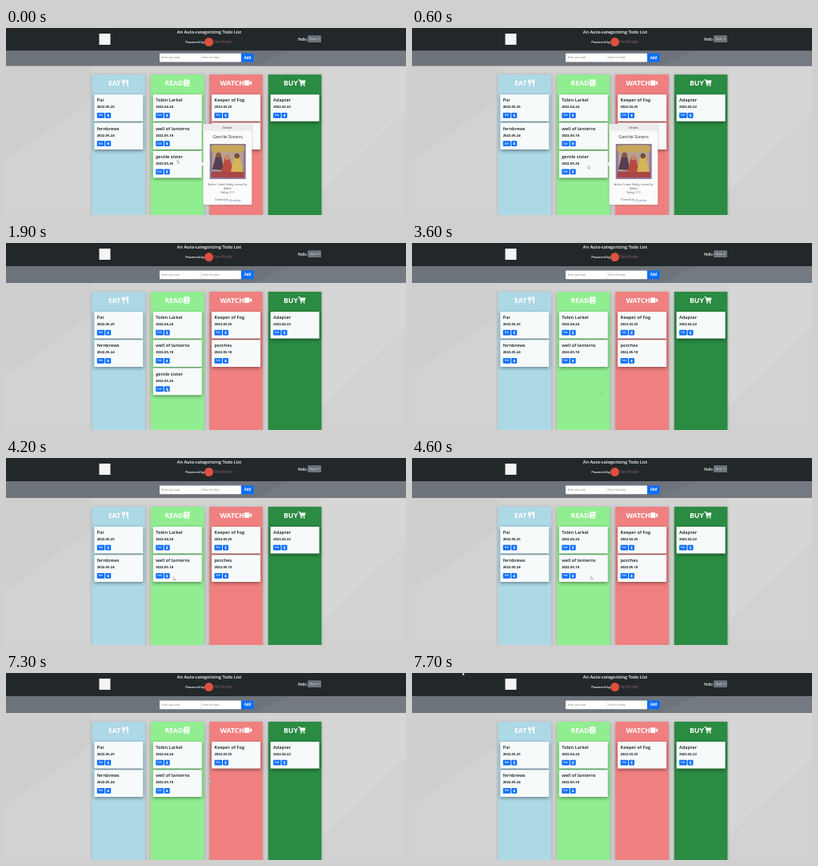
An HTML page with a canvas that plays this animation: 500 px wide and 234 px high, repeating every 8400 ms.

```html
<!DOCTYPE html>
<html lang="en">
<head>
<meta charset="utf-8">
<title>Todo list</title>
<style>
html, body { margin: 0; width: 100%; height: 100%; overflow: hidden; background: #d2d2d2; }
canvas { display: block; width: 500px; height: 234px; }
</style>
</head>
<body>
<canvas id="stage"></canvas>
<script>
const W = 500, H = 234, LOOP = 8400;
const CLOSE = 1100, DELETE_BOOK = 2500, DELETE_SHOW = 5300;
const BLUE = '#0d6efd', INK = '#16191c';
const FONT = '"Open Sans", "Noto Sans", sans-serif';

const canvas = document.getElementById('stage');
const ctx = canvas.getContext('2d');
const scale = Math.max(1, window.devicePixelRatio || 1);
canvas.width = W * scale;
canvas.height = H * scale;

const columns = [
  { x: 107.5, name: 'EAT', color: '#add8e6', labelX: 128, icon: utensils, iconX: 145,
    cards: [['Pai', '2022-05-25'], ['fernbrews', '2022-05-24']] },
  { x: 181, name: 'READ', color: '#90ee90', labelX: 198.5, icon: book, iconX: 222,
    cards: [['Tobin Larkel', '2022-04-24'], ['well of lanterns', '2022-05-18'],
            ['gentle sister', '2022-05-26', DELETE_BOOK]] },
  { x: 254.3, name: 'WATCH', color: '#f08080', labelX: 267.5, icon: camera, iconX: 298,
    cards: [['Keeper of Fog', '2022-03-25'], ['porches', '2022-05-10', DELETE_SHOW]] },
  { x: 327.8, name: 'BUY', color: '#2a8b42', labelX: 347, icon: cart, iconX: 365,
    cards: [['Adapter', '2022-02-22']] }
];

// time, x, y of the pointer
const path = [
  [0, 214, 165], [600, 220, 172], [1200, 220, 172], [1900, 201, 182],
  [3500, 201, 182], [3600, 235, 184], [4200, 209, 149], [4400, 211, 148],
  [5100, 274, 147], [5300, 276, 149], [7200, 276, 149], [7700, 63, -1], [LOOP, 63, -1]
];

function rect(x, y, w, h, color, r = 0) {
  ctx.fillStyle = color;
  ctx.beginPath();
  ctx.roundRect(x, y, w, h, r);
  ctx.fill();
}

function shape(color, ...points) {
  ctx.fillStyle = color;
  ctx.beginPath();
  points.forEach(p => ctx.lineTo(p[0], p[1]));
  ctx.closePath();
  ctx.fill();
}

function disc(x, y, r, color) {
  ctx.fillStyle = color;
  ctx.beginPath();
  ctx.arc(x, y, r, 0, Math.PI * 2);
  ctx.fill();
}

function text(str, x, y, size, color, weight = 400, align = 'left') {
  ctx.font = `${weight} ${size}px ${FONT}`;
  ctx.fillStyle = color;
  ctx.textAlign = align;
  ctx.fillText(str, x, y);
}

function shadow(blur, dy, color) {
  ctx.shadowBlur = blur * scale;
  ctx.shadowOffsetY = dy * scale;
  ctx.shadowColor = color;
}

function noShadow() {
  ctx.shadowColor = 'transparent';
}

// Heading icons, drawn from their top left corner
function utensils(x, y) {
  for (let i = 0; i < 3; i++) rect(x + i * 1.5, y, 1, 3.5, '#fff', .4);
  rect(x, y + 2.5, 4, 1.8, '#fff', .8);
  rect(x + 1.4, y + 3, 1.2, 5.4, '#fff', .5);
  rect(x + 5.2, y, 2.7, 5, '#fff', 1.2);
  rect(x + 6.5, y, 1.4, 8.4, '#fff', .5);
}

function book(x, y, ink) {
  rect(x, y, 7.4, 8.4, '#fff', 1);
  rect(x + 1.4, y + 6.2, 5.2, 1, ink);
  rect(x + 2, y + 2, 3.8, .6, ink);
  rect(x + 2, y + 3.4, 3.8, .6, ink);
}

function camera(x, y) {
  rect(x, y + 1, 6.3, 6.6, '#fff', 1);
  shape('#fff', [x + 6.6, y + 3.4], [x + 9.2, y + 1.6], [x + 9.2, y + 7], [x + 6.6, y + 5.2]);
}

function cart(x, y) {
  rect(x, y, 2.6, 1, '#fff', .4);
  shape('#fff', [x + 1.8, y], [x + 2.7, y], [x + 4, y + 6], [x + 3, y + 6]);
  shape('#fff', [x + 2.5, y + 1.1], [x + 9.6, y + 1.1], [x + 8.6, y + 4.9], [x + 3.2, y + 4.9]);
  rect(x + 3.1, y + 5.4, 5.5, .9, '#fff');
  disc(x + 4, y + 7.5, .9, '#fff');
  disc(x + 7.7, y + 7.5, .9, '#fff');
}

function drawBackdrop() {
  rect(0, 0, W, H, '#d2d2d2');
  shape('#d6d6d6', [394, 47], [500, 47], [500, 105], [394, 205]);
  shape('#cecece', [0, 47], [107, 47], [107, 90], [0, 165]);
}

function drawHeader(open) {
  const dy = open ? -2.6 : 0;
  const split = open ? 28.3 : 29, end = open ? 47.5 : 50;
  rect(0, 0, W, end, '#6d747b');
  shape('#747a81', [310, end], [355, split], [500, split], [500, end]);
  rect(0, 0, W, split, '#22272a');

  rect(116.5, 7, 14, 14, '#f4f4f4');
  text('An Auto-categorizing Todo List', 254, 6.7, 5.5, '#fff', 600, 'center');
  text('Powered by', 224.2, 18.7, 4.25, '#fff', 600);
  disc(253.6, 17.6, 5.5, '#de4f40');
  text('FernFinder', 260.2, 19.1, 4.6, '#8d6463');

  text('Hello', 365, 15.5, 4.4, '#fff', 600);
  rect(377, 9.2, 17, 8.8, '#6c757d', 1);
  text('User', 379.6, 15, 3.8, '#eee');
  shape('#eee', [389.6, 13], [391.8, 13], [390.7, 14.3]);

  const y = 34.4 + dy;
  rect(192, y, 102, 10.8, '#fff', .8);
  rect(243, y, .5, 10.8, '#ced4da');
  text('Enter your task', 194.7, y + 6.5, 3.2, '#777');
  text('Enter the date', 245.6, y + 6.5, 3.2, '#777');
  rect(294, y, 15.8, 10.8, BLUE, 1);
  text('Add', 302, y + 6.8, 4.4, '#fff', 700, 'center');
}

function drawCard(x, y, title, date) {
  shadow(4, 1.6, 'rgba(0,0,0,.42)');
  rect(x, y, 61, 33.6, '#f7fafb', .6);
  noShadow();
  text(title, x + 3.4, y + 9, 5.7, INK, 600);
  text(date, x + 3.4, y + 17, 4.2, INK, 700);
  rect(x + 3.5, y + 22.7, 9.5, 6.8, BLUE, .8);
  text('Edit', x + 8.2, y + 27.1, 2.9, '#fff', 600, 'center');
  rect(x + 13.9, y + 22.7, 7, 6.8, BLUE, .8);
  rect(x + 16.2, y + 24.5, 2.4, .6, '#fff');
  rect(x + 16.5, y + 25.4, 1.8, 2.3, '#fff', .3);
}

function drawColumn(col, t, dy) {
  const top = 61 + dy;
  shadow(4, 1, 'rgba(0,0,0,.25)');
  rect(col.x, top, 66.6, H - top + 8, col.color);
  noShadow();
  text(col.name, col.labelX, top + 13.8, 8.7, '#fff', 700);
  col.icon(col.iconX, top + 6.3, col.color);
  col.cards.forEach(([title, date, gone = Infinity], i) => {
    if (t < gone) drawCard(col.x + 2.8, top + 25 + i * 35.3, title, date);
  });
}

function drawCover(x, y) {
  rect(x, y, 45, 44, '#8c7897');
  rect(x + 1.5, y + 1.5, 42, 9, '#c7a65c', 4);
  rect(x + 3, y + 10, 39, 24, '#b8a08e');
  shape('#563f55', [x + 3, y + 32], [x + 8, y + 14], [x + 14, y + 14], [x + 18, y + 33]);
  shape('#b84c43', [x + 14, y + 37], [x + 19, y + 17], [x + 25, y + 17], [x + 30, y + 37]);
  shape('#d6b458', [x + 26, y + 36], [x + 31, y + 15], [x + 37, y + 15], [x + 42, y + 36]);
  [[11, 14, '#8a573f'], [22, 17, '#c28a6b'], [34, 15, '#754b3c']]
    .forEach(([a, b, c]) => disc(x + a, y + b, 3.2, c));
  rect(x + 2, y + 35, 41, 7, '#a94745');
}

function drawPopup() {
  shadow(2, .5, 'rgba(0,0,0,.3)');
  rect(246.5, 120.2, 60.8, 101, '#fbfbfb', 1.2);
  noShadow();
  shape('#fbfbfb', [246.7, 167], [243.8, 170.2], [246.7, 173.4]);
  rect(246.5, 120.2, 60.8, 8.6, '#ececec', [1.2, 1.2, 0, 0]);
  const mid = 277;
  text('Details', mid, 126, 3.7, '#333', 400, 'center');
  text('Gentle Sisters', mid, 138, 5.9, '#333', 400, 'center');
  drawCover(254.7, 145);
  text('Author: Corwin Halsby, Lenora Fay', mid, 197.3, 3.05, '#555', 400, 'center');
  text('Aldwin', mid, 202.2, 3.05, '#555', 400, 'center');
  text('Rating: 3 / 5', mid, 206.8, 3.05, '#555', 400, 'center');
  text('Powered by', 261.6, 216.3, 3.05, '#555');
  text('Quorba', 279.2, 216.6, 4, '#5276b8');
}

function pointerAt(t) {
  const i = Math.max(1, path.findIndex(p => p[0] >= t));
  const [t0, x0, y0] = path[i - 1], [t1, x1, y1] = path[i];
  const k = (t - t0) / (t1 - t0);
  const e = k * k * (3 - 2 * k);
  return [x0 + (x1 - x0) * e, y0 + (y1 - y0) * e];
}

function drawPointer(t) {
  const [x, y] = pointerAt(Math.floor(t / 100) * 100);
  shape('#fff', [x, y], [x, y + 4], [x + 1, y + 3.2], [x + 1.7, y + 4.6],
    [x + 2.4, y + 4.2], [x + 1.8, y + 3], [x + 3, y + 2.8]);
  ctx.strokeStyle = 'rgba(50,50,50,.7)';
  ctx.lineWidth = .4;
  ctx.stroke();
}

function draw(t) {
  const open = t < CLOSE;
  ctx.setTransform(scale, 0, 0, scale, 0, 0);
  drawBackdrop();
  drawHeader(open);
  columns.forEach(col => drawColumn(col, t, open ? -2.8 : 0));
  if (open) drawPopup();
  drawPointer(t);
}

const start = performance.now();
function tick() {
  draw((performance.now() - start) % LOOP);
  requestAnimationFrame(tick);
}
tick();
</script>
</body>
</html>
```
